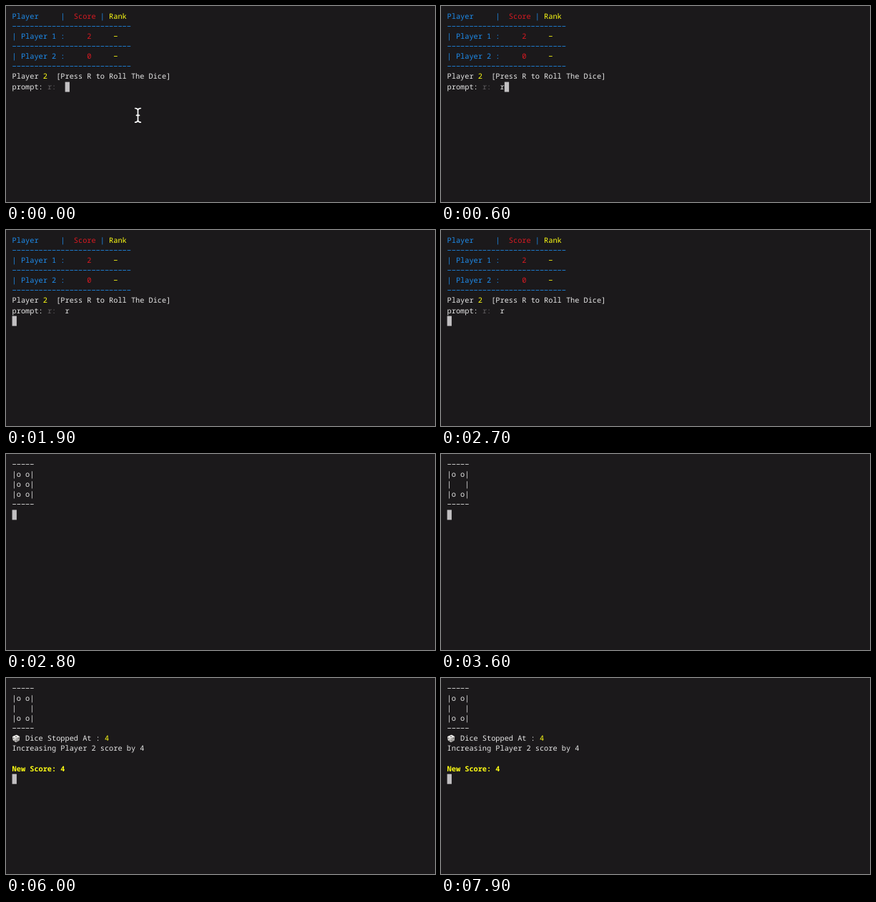
Recreate the animation shown at these times as an HTML page. Size 600 by 275 pixels, loop 8 s.

```html
<!DOCTYPE html>
<html lang="en">
<head>
<meta charset="utf-8">
<title>Dice game in a terminal</title>
<style>
html, body { margin: 0; width: 100%; height: 100%; overflow: hidden; background: #1b191b; }
pre, svg { position: absolute; margin: 0; }
pre {
  left: 8.6px; top: 8px; color: #e8e8e8;
  font: 10.283px/14.08px "Noto Sans Mono", monospace;
  font-variant-ligatures: none; text-rendering: geometricPrecision;
}
pre b { font-weight: inherit; }
.blue { color: #1e8cec; }
.red { color: #d91a22; }
.yellow { color: #ffff14; }
.dim { color: #626062; }
pre .strong { font-weight: 700; }
svg { left: 0; top: 0; width: 600px; height: 275px; }
</style>
</head>
<body>
<pre id="screen"></pre>
<svg viewBox="0 0 600 275">
  <rect id="cursor" width="6.3" height="14" fill="#c2c0c2"/>
  <g id="mouse" fill="none" stroke-linecap="round">
    <path id="beam" d="M180.7 143.5q3.8 0 3.8 3.6V159.6q0 3.6-3.8 3.6M188.3 143.5q-3.8 0-3.8 3.6V159.6q0 3.6 3.8 3.6M182.5 153.4h4" stroke="#fff" stroke-width="1.7"/>
  </g>
  <g id="die">
    <path d="M9 82.2 14.8 79.8 19.2 82.3 18.6 87.6 13.8 90.2 9.6 87.2z" fill="#cfcdca"/>
    <path d="M9 82.2 14.8 79.8 19.2 82.3 13.6 84.6z" fill="#efedea"/>
    <path d="M13.6 84.6 19.2 82.3 18.6 87.6 13.8 90.2z" fill="#aaa8a6"/>
    <g fill="#3a383a">
      <circle cx="14" cy="82.2" r=".8"/>
      <circle cx="10.7" cy="84.5" r=".6"/><circle cx="12.3" cy="87.7" r=".6"/>
      <circle cx="15" cy="87.9" r=".6"/><circle cx="17.3" cy="84.6" r=".6"/>
    </g>
  </g>
</svg>
<script>
const LOOP = 8000, COL = 6.17, ROW = 14.08;
const $ = id => document.getElementById(id);
const tint = (name, text) => `<b class="${name}">${text}</b>`;
const rule = n => "\u2212".repeat(n);

const playerRow = (n, score) =>
  tint("blue", `| Player ${n} :     `) + tint("red", score) + "     " + tint("yellow", rule(1));

const line = tint("blue", rule(27));
const board = [
  tint("blue", "Player     |  ") + tint("red", "Score") + tint("blue", " | ") + tint("yellow", "Rank"),
  line, playerRow(1, 2), line, playerRow(2, 0), line,
  `Player ${tint("yellow", 2)}  [Press R to Roll The Dice]`,
  `prompt: ${tint("dim", "r:")}  `
].join("\n");

const dice = middle => [rule(5), "|o o|", `|${middle}|`, "|o o|", rule(5)].join("\n");
const six = dice("o o"), four = dice("   ");

const result = [
  four,
  `   Dice Stopped At : ${tint("yellow", 4)}`,
  "Increasing Player 2 score by 4",
  "",
  tint("yellow strong", "New Score: 4")
].join("\n");

// start time, text, cursor column, cursor row
const steps = [
  [0, board, 12, 7],
  [600, board + "r", 13, 7],
  [1600, board + "r", 0, 8],
  [2800, six, 0, 5],
  [3600, four, 0, 5],
  [5100, six, 0, 5],
  [6000, result, 0, 9]
];

let shown;
function draw(now) {
  const t = now % LOOP;
  const step = steps.findLast(s => s[0] <= t);
  if (step !== shown) {
    const [, text, col, row] = shown = step;
    $("screen").innerHTML = text;
    $("cursor").setAttribute("x", 8.6 + col * COL);
    $("cursor").setAttribute("y", 8 + row * ROW);
    $("die").style.display = text === result ? "" : "none";
  }
  $("mouse").style.display = t < 100 ? "" : "none";
  requestAnimationFrame(draw);
}
draw(0);
</script>
</body>
</html>
```
